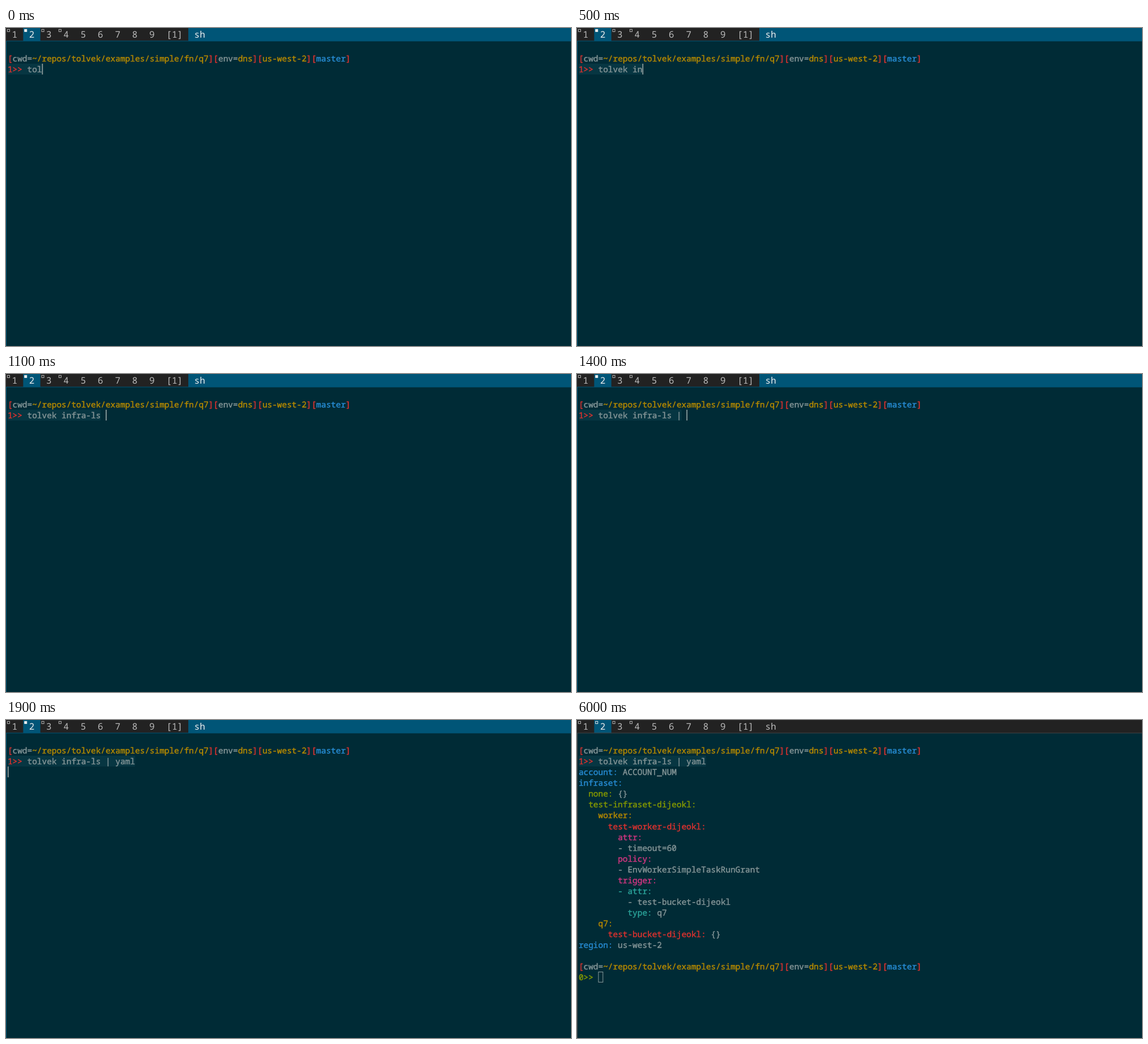
These frames come from a looping animation (998x561 px, 8000 ms). An HTML page:

```html
<!DOCTYPE html>
<html lang="en">
<head>
<meta charset="utf-8">
<title>Terminal</title>
<style>
html, body { margin: 0; width: 100%; height: 100%; overflow: hidden; background: #002b36; }
svg { display: block; width: 100%; height: 100%; }
text {
  font-family: "Noto Sans Mono", "DejaVu Sans Mono", monospace;
  white-space: pre;
  text-rendering: geometricPrecision;
}
.term text { font-size: 14.43px; stroke-width: 0.45px; }
.bar text { font-size: 15.9px; }
</style>
</head>
<body>
<svg id="stage" viewBox="0 0 998 561"></svg>
<script>
const LOOP = 8000;
const CELL = 8.657, ROW = 19.05, LEFT = 2.9, TOP = 63;
const TAB = 30.33, PAD = 10.4;
const GREY = '#839496', RED = '#dc322f', YELLOW = '#b58900', BLUE = '#268bd2',
      GREEN = '#859900', MAGENTA = '#d33682', CYAN = '#2aa198';
const DEPTH_COLORS = [BLUE, GREEN, YELLOW, RED, MAGENTA, CYAN];
const ACCENT = '#005577', DARK = '#222222', DIM = '#bbbbbb', BRIGHT = '#eeeeee', EDGE = '#444444';

const COMMAND = 'tolvek infra-ls | yaml';
const OUTPUT = `account: ACCOUNT_NUM
infraset:
  none: {}
  test-infraset-dijeokl:
    worker:
      test-worker-dijeokl:
        attr:
        - timeout=60
        policy:
        - EnvWorkerSimpleTaskRunGrant
        trigger:
        - attr:
          - test-bucket-dijeokl
          type: q7
    q7:
      test-bucket-dijeokl: {}
region: us-west-2`.split('\n');

// [time, typed characters]
const TYPING = [
  [0, 3], [200, 5], [300, 6], [400, 8], [500, 9], [600, 10], [700, 11], [800, 13],
  [900, 14], [1000, 15], [1100, 16], [1300, 17], [1400, 18], [1600, 19], [1700, 21], [1800, 22]
];
const ENTER = 1900, PRINT = 4700, BLUR = 6000;

const colX = col => LEFT + col * CELL;
const rowY = row => TOP + row * ROW;

function add(parent, name, attrs = {}, content = '') {
  const node = document.createElementNS('http://www.w3.org/2000/svg', name);
  for (const key in attrs) node.setAttribute(key, attrs[key]);
  node.textContent = content;
  return parent.appendChild(node);
}

const rect = (parent, x, y, width, height, fill) =>
  add(parent, 'rect', { x, y, width, height, fill });

// A thin stroke in the text colour gives a medium weight.
function line(parent, row, col, parts) {
  const text = add(parent, 'text', { x: colX(col), y: rowY(row) + 15.2 });
  for (const [color, content] of parts)
    add(text, 'tspan', { fill: color, stroke: color }, content);
  return text;
}

const promptLine = (parent, row) => line(parent, row, 0, [
  [RED, '['], [GREY, 'cwd='], [YELLOW, '~/repos/tolvek/examples/simple/fn/q7'],
  [RED, ']['], [GREY, 'env='], [YELLOW, 'dns'],
  [RED, ']['], [YELLOW, 'us-west-2'],
  [RED, ']['], [BLUE, 'master'], [RED, ']']
]);

function yamlLine(parent, row, source) {
  const [, indent, dash = '', key = '', rest] = source.match(/^( *)(- )?([\w-]+:)?(.*)$/);
  const color = DEPTH_COLORS[(indent.length + dash.length) / 2];
  line(parent, row, indent.length, key ? [[color, dash + key], [GREY, rest]] : [[GREY, dash + rest]]);
}

const stage = document.getElementById('stage');
rect(stage, 0, 0, 998, 561, '#002b36');

// Status bar
const bar = add(stage, 'g', { class: 'bar' });
const label = (x, fill, content) => add(bar, 'text', { x, y: 17.4, fill }, content);
rect(bar, 0, 0, 998, 23, DARK);
const titleBack = rect(bar, 322, 0, 676, 23, ACCENT);
rect(bar, TAB, 0, TAB, 23, ACCENT);
for (let i = 0; i < 9; i++) label(i * TAB + PAD, i === 1 ? BRIGHT : DIM, String(i + 1));
label(9 * TAB + PAD, DIM, '[1]');
const title = label(332.6, BRIGHT, 'sh');
const marks = [0, 1, 2, 3].map(i => add(bar, 'rect', {
  x: i * TAB + 2.4, y: 2.4, width: 4, height: 4,
  fill: 'none', stroke: i === 1 ? BRIGHT : DIM, 'stroke-width': 0.95
}));
const border = add(stage, 'path', { d: 'M0.5 561V23H998', fill: 'none', 'stroke-width': 1 });

// Terminal
const term = add(stage, 'g', { class: 'term' });
const highlight = rect(term, LEFT, TOP, 0, ROW, '#073642');
promptLine(term, -1);
line(term, 0, 0, [[RED, '1>>']]);
const typed = line(term, 0, 4, [[GREY, '']]).firstChild;
const output = add(term, 'g');
OUTPUT.forEach((source, i) => yamlLine(output, i + 1, source));
promptLine(output, 19);
line(output, 20, 0, [[GREEN, '0>>']]);
const cursor = rect(term, 0, 0, 1.7, ROW, '#93a1a1');
const hollowCursor = add(term, 'rect', {
  x: colX(4) + 0.4, y: rowY(20) + 0.5, width: CELL - 0.8, height: ROW - 1,
  fill: 'none', stroke: '#93a1a1', 'stroke-width': 0.95
});

const show = (node, visible) => node.setAttribute('display', visible ? 'inline' : 'none');

function render(t) {
  const count = TYPING.filter(([time]) => time <= t).pop()[1];
  const text = COMMAND.slice(0, count);
  typed.textContent = text;
  highlight.setAttribute('width', (4 + text.trimEnd().length) * CELL);

  const [row, col] = t < ENTER ? [0, 4 + count] : t < PRINT ? [1, 0] : [20, 4];
  cursor.setAttribute('x', colX(col));
  cursor.setAttribute('y', rowY(row));

  const focused = t < BLUR;
  show(output, t >= PRINT);
  show(cursor, focused);
  show(hollowCursor, !focused);
  show(titleBack, focused);
  border.setAttribute('stroke', focused ? ACCENT : EDGE);
  title.setAttribute('fill', focused ? BRIGHT : DIM);
  marks[1].setAttribute('fill', focused ? BRIGHT : 'none');
}

const start = performance.now();
function tick() {
  render((performance.now() - start) % LOOP);
  requestAnimationFrame(tick);
}
tick();
</script>
</body>
</html>
```
